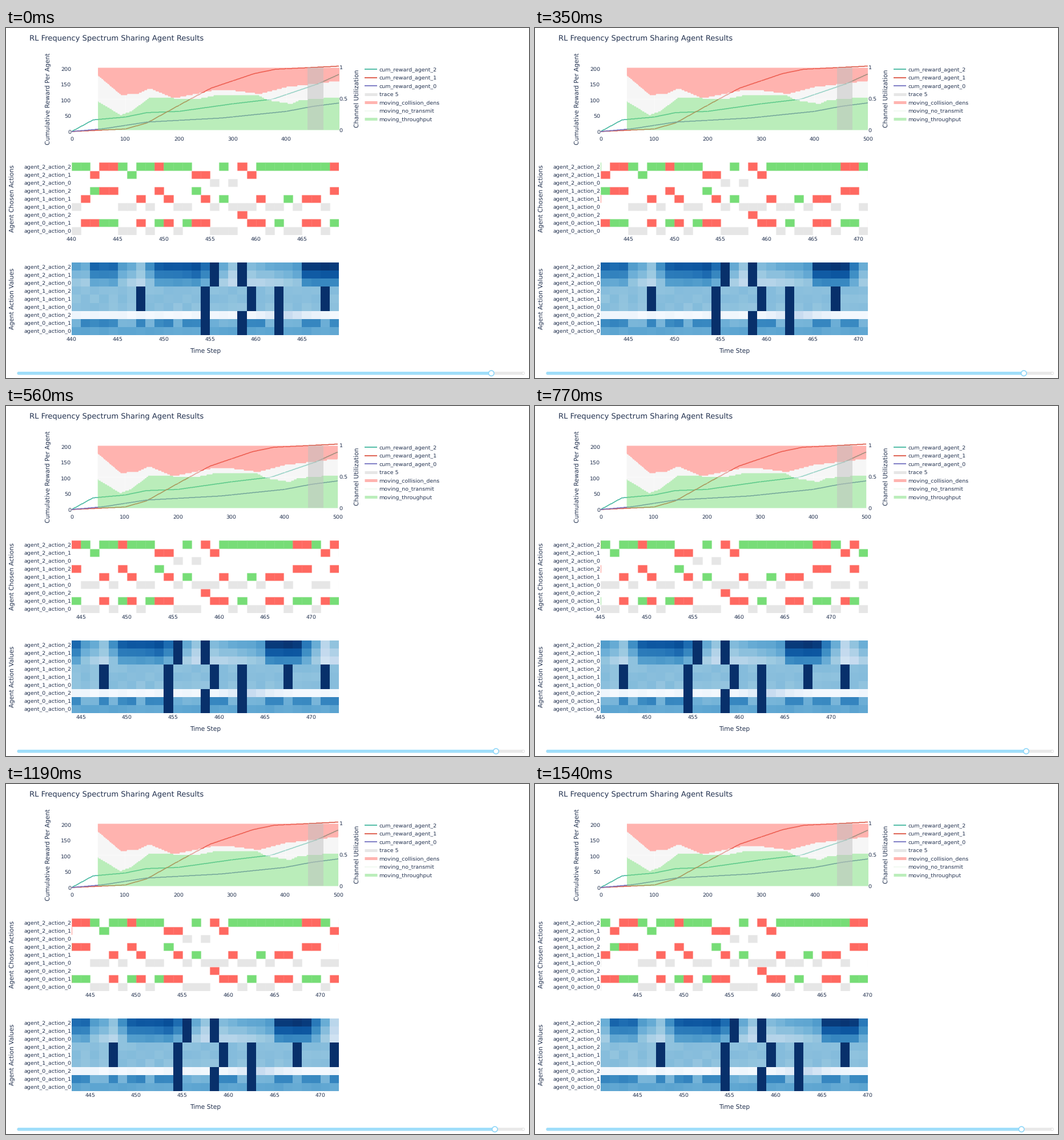
These frames come from a looping animation (916x612 px, 1610 ms). A matplotlib script:

```python
import numpy as np
import matplotlib.pyplot as plt
from matplotlib.animation import FuncAnimation
from matplotlib.colors import to_rgba
from matplotlib.patches import Circle, FancyBboxPatch, Rectangle

W, H = 916, 612
PT = 0.72                       # points per pixel at 100 dpi
LEFT, RIGHT = 115, 583
FIRST, SPAN, STEPS = 440, 29, 34
INK = "#22314f"
RED, GREEN, GRAY = "#ff6961", "#77dd77", "#e6e6e6"
TEAL, BRICK, VIOLET = "#45b8a0", "#dc5543", "#7472c0"

plt.rcParams.update({
    "font.family": "DejaVu Sans", "font.size": 9.5 * PT,
    "text.color": INK, "text.hinting": "none",
    "xtick.color": INK, "ytick.color": INK,
})
fig = plt.figure(figsize=(W / 100, H / 100), dpi=100, facecolor="white")


def panel(top, bottom, ylim, pad=0):
    ax = fig.add_axes([LEFT / W, 1 - bottom / H, (RIGHT - LEFT) / W, (bottom - top) / H])
    ax.set_ylim(*ylim)
    ax.patch.set_visible(False)
    for side in ax.spines.values():
        side.set_visible(False)
    ax.tick_params(axis="x", length=0, pad=pad * PT, labelsize=9.4 * PT)
    ax.tick_params(axis="y", length=0, pad=0.6 * PT)
    return ax


def label(x, y, text, size=9.5, **kw):
    kw = {"ha": "left", "va": "center_baseline", **kw}
    page.text(x, y, text, fontsize=size * PT, **kw)


def side_title(x, y, text):
    label(x, y, text, 10.7, ha="center", va="center", rotation=90)


def through(x, points):
    """Straight segments through a few (x, y) points."""
    return np.interp(x, *zip(*points))


# Page overlay in pixel coordinates
page = fig.add_axes([0, 0, 1, 1], zorder=-1)
page.set(xlim=(0, W), ylim=(H, 0))
page.axis("off")

label(41, 17, "RL Frequency Spectrum Sharing Agent Results", 13.1)
side_title(74, 123.5, "Cumulative Reward Per Agent")
side_title(614.5, 123.5, "Channel Utilization")
side_title(11, 298, "Agent Chosen Actions")
side_title(11, 473, "Agent Action Values")
label(349, 564, "Time Step", 10.8, ha="center")

# Cumulative rewards
rewards = {
    TEAL: [(0, 0), (40, 37), (100, 46), (140, 60), (200, 64), (300, 88),
           (375, 103), (460, 152), (500, 183)],
    BRICK: [(0, 0), (100, 8), (140, 27), (220, 102), (260, 138), (340, 184),
            (380, 198), (500, 208)],
    VIOLET: [(0, 0), (60, 9), (140, 30), (280, 43), (400, 64), (450, 80), (500, 91)],
}
ax_reward = panel(60, 184, (-3 / 0.55, 121 / 0.55), 6.4)
ax_reward.set_xticks(range(0, 501, 100))
ax_reward.set_yticks(range(0, 201, 50))
t = np.arange(500)
for color, points in rewards.items():
    ax_reward.plot(t, np.round(through(t, points)), color=color, lw=1.6 * PT)

# Channel shares over a moving window of 50 steps
ax_share = panel(60, 184, (-6 / 109, 118 / 109))
ax_share.set_xticks([])
ax_share.yaxis.tick_right()
ax_share.tick_params(axis="y", length=0, pad=0.6 * PT)
ax_share.set_yticks([0, 0.5, 1], ["0", "0.5", "1"])
window = np.arange(48.5, 500)
sent = [(48, 0.46), (60, 0.4), (91, 0.24), (110, 0.3), (145, 0.52), (235, 0.5),
        (270, 0.56), (345, 0.57), (365, 0.48), (409, 0.42), (425, 0.48), (499, 0.53)]
free = [(48, 0.88), (92, 0.56), (125, 0.59), (145, 0.67), (190, 0.51), (260, 0.63),
        (300, 0.635), (350, 0.58), (400, 0.69), (499, 0.79)]
low, high = (np.round(through(window, p) * 50) / 50 for p in (sent, free))
for lower, upper, color, z in ((low, high, "#eeeeee", 1), (0, low, GREEN, 3),
                               (high, 1, RED, 3)):
    ax_share.fill_between(window, lower, upper, color=color, alpha=0.5, lw=0, zorder=z)
ax_share.axhline(0.5, color="white", lw=PT, alpha=0.6, zorder=2)
for x in range(100, 500, 100):
    ax_share.axvline(x, color="white", lw=PT, alpha=0.4, zorder=2)
band = ax_share.add_patch(Rectangle((FIRST, 0), SPAN, 1, fc="#c0c0c0", alpha=0.5,
                                    lw=0, zorder=4))

# Legend
legend = [
    ("cum_reward_agent_2", TEAL, 1.8),
    ("cum_reward_agent_1", BRICK, 1.8),
    ("cum_reward_agent_0", VIOLET, 1.8),
    ("trace 5", GRAY, 5),
    ("moving_collision_dens", "#ffb4b0", 5),
    ("moving_no_transmit", "#f1f9f1", 2),
    ("moving_throughput", "#bbeebb", 5),
]
for i, (name, color, width) in enumerate(legend):
    y = 72 + 14.55 * i
    page.plot([627.5, 650], [y, y], color=color, lw=width * PT, solid_capstyle="butt")
    label(653.5, y, name)

# Channel chosen at each step; 0 means silent, a shared channel is a collision
choices = {
    2: "2212221222" "2221102021" + "2" * 11 + "121",
    1: "0122200102" "1002101000" "1001011022" "0020",
    0: "0111100101" "1011100021" "1010011011" "0110",
}
rows = [(a, c) for a in (2, 1, 0) for c in (2, 1, 0)]
row_names = [f"agent_{a}_action_{c}" for a, c in rows]
ax_act = panel(235, 362, (8.5, -0.5), 3.2)
ax_val = panel(410, 537, (8.5, -0.5), 2.7)
for ax in (ax_act, ax_val):
    ax.set_xticks(range(FIRST, FIRST + 40, 5))
    ax.set_yticks(range(9), row_names)

for step, picks in enumerate(zip(*choices.values()), FIRST):
    for agent, pick in zip(choices, picks):
        if pick == "0":
            color = GRAY
        else:
            color = RED if picks.count(pick) > 1 else GREEN
        row = rows.index((agent, int(pick)))
        ax_act.add_patch(Rectangle((step, row - 0.47), 1, 0.94, fc=color,
                                   ec=to_rgba(color, 0.35), lw=1.2 * PT))

# Action values: agent 2 swings, agent 0 favours what it picks, the rest idles
steps = FIRST + np.arange(STEPS)
swing = through(steps, [(440, 0.54), (441, 0.5), (442, 0.78), (444, 0.78), (445, 0.58),
                        (447, 0.42), (449, 0.82), (453, 0.87), (457, 0.38), (464, 0.58),
                        (465, 0.96), (468, 0.96), (471, 0.28), (473, 0.5)])
picked = np.array([c == "1" for c in choices[0]])
rng = np.random.default_rng(4)
values = rng.uniform(-0.02, 0.02, (9, STEPS))
values[:3] += np.outer([1, 0.87, 0.69], swing)
values[3:6] += 0.42
values[6] += 0.03 + 0.2 * np.exp(-((steps - 463) / 2) ** 2)
values[7] += 0.48 + 0.18 * picked
values[8] += 0.53
peaks = {0: (455, 458), 3: (447, 454, 459, 462, 467, 471), 6: (454, 458, 462)}
for row, times in peaks.items():
    values[row:row + 3, np.isin(steps, times)] = 1
ax_val.pcolormesh(np.arange(FIRST, FIRST + STEPS + 1), np.arange(10) - 0.5, values,
                  cmap="Blues", vmin=0, vmax=1)


# Slider
def rail(x0, x1, color):
    bar = FancyBboxPatch((x0, 601), x1 - x0, 5.4, fc=color, lw=0,
                         boxstyle="round,pad=0,rounding_size=2.6")
    return page.add_patch(bar)


rail(19.5, 908, "#e9e9e9")
track = rail(19.5, 850, "#9fdefa")
page.add_patch(Circle((906, 603.7), 2.2, fc="white", ec="#e0e0e0", lw=PT, zorder=3))
knob = page.add_patch(Circle((850, 603.7), 4.7, fc="white", ec="#8dd6f8",
                             lw=1.6 * PT, zorder=4))

# Slider value by tick; the plots follow one tick later, except where they keep up
drag = {0: 440, 1: 441, 3: 442, 5: 443, 8: 444, 10: 445, 14: 444, 16: 443,
        19: 442, 21: 441}
in_step = (0, 8)


def slider_at(n):
    return drag[max(k for k in drag if k <= n)]


def update(n):
    x = 850 + 2.05 * (slider_at(n) - FIRST)
    knob.center = (x, 603.7)
    track.set_width(x - 19.5)
    start = slider_at(n if n in in_step else n - 1)
    for ax in (ax_act, ax_val):
        ax.set_xlim(start, start + SPAN)
    for ax in (ax_reward, ax_share):
        ax.set_xlim(0, start + 2 * SPAN)
    band.set_x(start)
    return []


anim = FuncAnimation(fig, update, frames=23, interval=70, repeat=True,
                     repeat_delay=0, blit=False)
plt.show()
```
